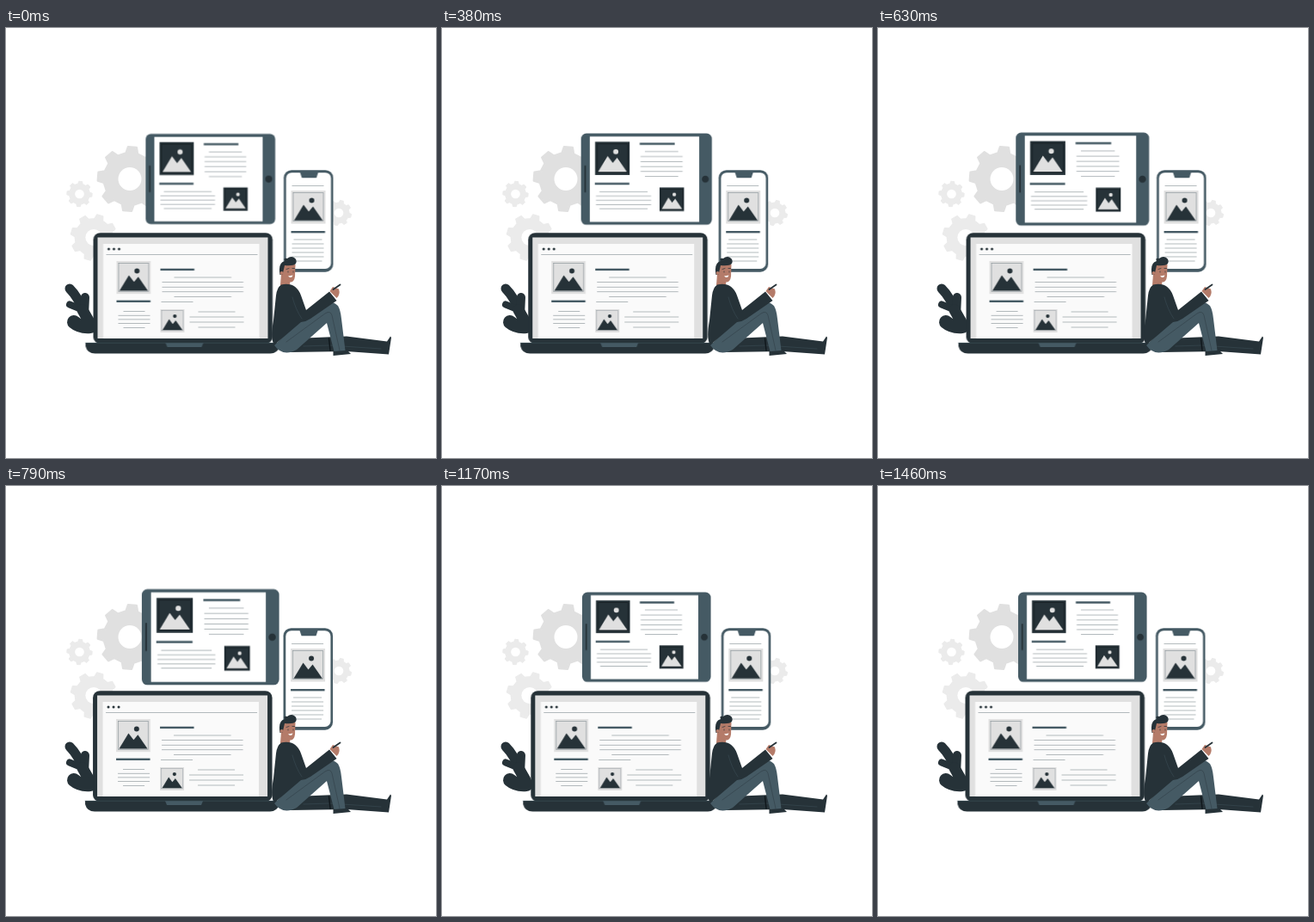
An HTML page for the animation above (1500 ms loop, 500 px wide and 500 px high).

```html
<!DOCTYPE html>
<html lang="en">
<head>
<meta charset="utf-8">
<title>Responsive pages</title>
<style>
html, body { margin: 0; width: 100%; height: 100%; overflow: hidden; background: #fff; }
svg { display: block; width: 100%; height: 100%; }
#tablet { transform-origin: 237.7px 175.7px; }
</style>
</head>
<body>
<svg viewBox="0 0 500 500">
  <g id="gears"></g>
  <g id="plant"></g>
  <g id="tablet"></g>
  <g id="laptop"></g>
  <g id="phone"></g>
  <g id="man"></g>
</svg>
<script>
const DARK = '#263238', SLATE = '#455a64', PALE = '#e0e0e0', FAINT = '#ebebeb';
const INK = '#838e93', BLACK = '#10181c', SKIN = '#b47b69';

const draw = (id, ...parts) => { document.getElementById(id).innerHTML = parts.join(''); };
const rect = (x, y, w, h, fill, rx = 0) =>
  `<rect x="${x}" y="${y}" width="${w}" height="${h}" rx="${rx}" fill="${fill}"/>`;
const dot = (x, y, r, fill) => `<circle cx="${x}" cy="${y}" r="${r}" fill="${fill}"/>`;
const shape = (d, fill) => `<path d="${d}" fill="${fill}"/>`;
const stroke = (d, color, width) =>
  `<path d="${d}" fill="none" stroke="${color}" stroke-width="${width}" stroke-linecap="round"/>`;

const bar = (x, y, w) => rect(x, y, w, 2.4, SLATE);
const rule = (x, y, w) => rect(x, y - .3, w, .6, INK);

// Centred paragraph whose first and last rows are shorter
const para = (x, y, w, rows, step, inset) =>
  Array.from({ length: rows }, (_, i) => {
    const cut = i % (rows - 1) ? 0 : inset;
    return rule(x + cut, y + i * step, w - 2 * cut);
  }).join('');

// Framed landscape, laid out on a 40 x 38.5 grid
const picture = (x, y, w, back, front) =>
  `<g transform="translate(${x} ${y}) scale(${w / 40})">
    ${rect(0, 0, 40, 38.5, back)}
    <rect x="2.5" y="2.5" width="35" height="33" fill="none" stroke="${back === DARK ? BLACK : INK}" stroke-width=".6"/>
    ${shape('M3.500 34.800L14.500 16.500L20.500 24.500L25.500 18.500L36.800 34.800Z', front)}
    ${dot(24, 11.5, 3, front)}
  </g>`;

const gear = (x, y, r, turn, fill) => {
  const teeth = 8, pts = [];
  for (let i = 0; i < teeth * 4; i++) {
    const side = i % 4, tip = side === 1 || side === 2;
    const a = (Math.floor(i / 4) + turn + (side < 2 ? -1 : 1) * (tip ? .17 : .29)) * 2 * Math.PI / teeth;
    const k = r * (tip ? .97 : .79);
    pts.push(`${x + k * Math.sin(a)} ${y - k * Math.cos(a)}`);
  }
  return `<path d="M${pts.join('L')}Z" fill="${fill}" stroke="${fill}" stroke-width="${r * .06}" stroke-linejoin="round"/>`
    + dot(x, y, r * .35, '#fff');
};

draw('gears',
  gear(144, 175.5, 38.5, .1, PALE),
  gear(102, 243.5, 27.5, .35, FAINT),
  gear(85.5, 193, 15.2, .1, FAINT),
  gear(387, 215, 15.2, .3, FAINT));

draw('plant',
  stroke('M74 303Q84 313 90 330', DARK, 11),
  stroke('M92 313L91 334', DARK, 10),
  stroke('M74 321.500L90 328', DARK, 8),
  stroke('M89 328L97 342', DARK, 13),
  stroke('M79 342Q86 348 98 347', DARK, 16));

draw('tablet',
  rect(163, 123.5, 149.5, 104.3, SLATE, 6),
  rect(173, 127, 125, 97.5, '#fff'),
  rect(166.8, 160, 1.8, 31, DARK, .9),
  dot(305, 175.7, 4, DARK),
  picture(179, 133, 39.5, DARK, PALE),
  picture(252.7, 185.3, 28, DARK, PALE),
  bar(230, 134.2, 40), bar(178.7, 179.8, 39.5),
  para(231, 144.2, 48, 6, 5.7, 5),
  para(180, 190.3, 63, 5, 4.8, 4));

draw('laptop',
  rect(102, 238.2, 208.5, 129, DARK, 8),
  rect(107, 243.5, 198, 117.5, PALE),
  rect(113.5, 251, 181.5, 110, '#fafafa'),
  [120, 126, 132].map(x => dot(x, 257, 1.5, DARK)).join(''),
  rule(117, 263.5, 176),
  picture(129, 271, 39.7, PALE, DARK),
  picture(180, 327, 28, PALE, DARK),
  bar(180, 279.7, 39.5), bar(129, 316.6, 39.5),
  para(182, 290, 94.5, 5, 5.6, 14), rule(181, 318.5, 37),
  para(131, 329.5, 37, 5, 4.7, 6),
  para(214, 330, 63, 4, 6, 10),
  shape('M93 366H319V370Q316 378.500 308 378.500H104Q95 378.500 93 370Z', DARK),
  stroke('M93 366.200H319', SLATE, .5),
  shape('M186 366.200H230L228 371H188Z', SLATE));

draw('phone',
  rect(323.5, 165.2, 57.5, 118.5, SLATE, 9),
  rect(326.2, 168.2, 52.2, 111.8, '#fff', 6.5),
  shape('M342.500 168H363.500L361.500 174.200H344.500Z', SLATE),
  picture(332, 189, 40, PALE, DARK),
  bar(332, 236, 39.5),
  rule(333, 183.5, 37),
  para(333, 246, 37, 6, 5, 2));

const seam = (d, color = SLATE) => stroke(d, color, .4);
draw('man',
  // far leg and shoes
  shape('M336 361L396 358.500L443 364.500L447 358.500L448 360L445 379.500L396 376L330 377Z', DARK),
  seam('M346 370L376 369L436 373'),
  stroke('M375.500 361L377 375', BLACK, 1.5),
  shape('M380.500 375L394 373.500Q399 376 401 379L380.500 381Z', DARK),
  // near leg
  shape('M312 369L329 352L367 322Q378 315 386 323Q389 328 390 338L394.500 375L381.500 376L373 343L338 374Q322 383 312 369Z', SLATE),
  seam('M326 365L371 332Q377 328 379 334L388 375', DARK),
  // body and arm
  shape('M320 286H331L330 299H319Z', SKIN),
  shape('M320 298.500Q337 295 343 311L349 328L376 306.500L384.500 317L354 338Q349 341.500 343 342L312 368.500Q307 362 311 340L314 311Q315 302 320 298.500Z', DARK),
  seam('M333 313Q337 328 344 338'),
  // head
  shape('M321 275H336.500L336 289Q335 296.500 329 295.500Q323 294 321 288Z', SKIN),
  shape('M318.500 287Q316 273 324 271Q322 267 327 268Q331 264.500 335 267Q339 269 337 274Q334 277 324 276L321.500 287Z', DARK),
  dot(320.5, 285, 2, SKIN),
  shape('M328 288.500L333.500 287.500Q332 292 328 288.500Z', '#fff'),
  stroke('M326 280.500L329 279.500M333 279.500H335.500M328 283V284M334 283V284', DARK, .7),
  // hand and handset
  shape('M376.500 306L380 301L387 303.500Q389 310 384.500 314Z', SKIN),
  stroke('M380.500 304L388.500 298.500', DARK, 1.8));

const LOOP = 1500, LEAD = 20, STEPS = 60;
const play = (id, pose) => document.getElementById(id).animate(
  Array.from({ length: STEPS + 1 }, (_, i) => ({ transform: pose(i * LOOP / STEPS) })),
  { duration: LOOP, delay: -LEAD, iterations: Infinity });

// Two equal linear swells, then a rest
const swell = (t, peak) => Math.max(0, 1 - Math.abs(t - peak) / 225);
const beat = t => `scale(${1 + .081 * (swell(t, 225) + swell(t, 775))})`;

// Side to side every tenth of the loop, growing to 3px and fading again
const sway = i => (-1) ** i * Math.min(i, 10 - i, 3);
const shake = t => {
  const u = t * 10 / LOOP, i = Math.floor(u);
  return `translateX(${sway(i) + (sway(i + 1) - sway(i)) * (u - i) - .4}px)`;
};

play('tablet', beat);
play('laptop', shake);
play('phone', shake);
</script>
</body>
</html>
```
